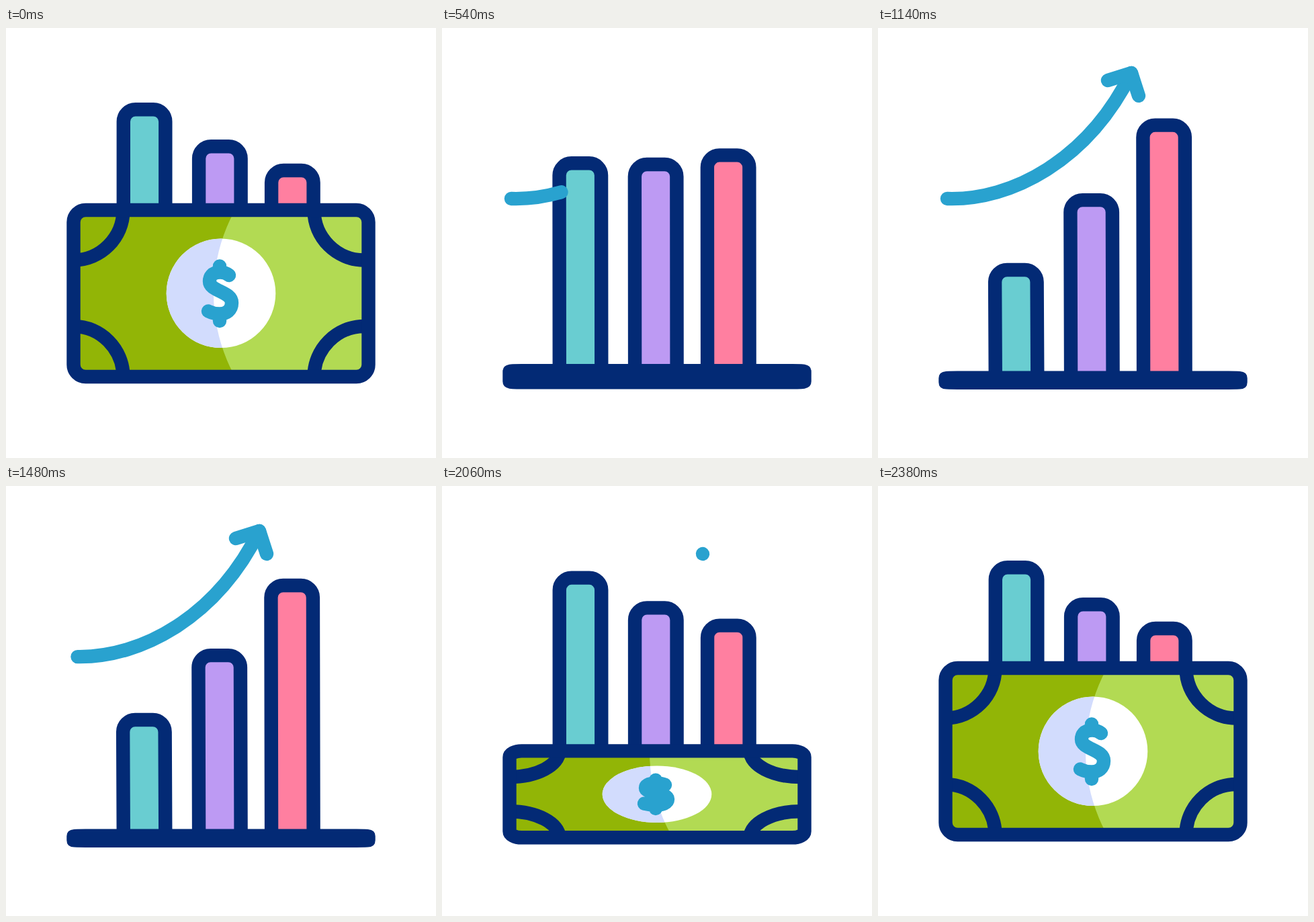
Animation, 640 px wide and 640 px high, one loop 2.4 s. Source, as an HTML page:

```html
<!DOCTYPE html>
<html lang="en">
<head>
<meta charset="utf-8">
<title>Money and growth</title>
<style>
  html, body { margin: 0; width: 100%; height: 100%; overflow: hidden; background: #fff; }
  svg { display: block; width: 100%; height: 100%; }
  .line { fill: none; stroke: #032a75; stroke-width: 20.4; stroke-linejoin: round; }
  .blue { fill: none; stroke: #29a2cf; stroke-width: 20.4; stroke-linecap: round; stroke-linejoin: round; }
</style>
</head>
<body>
<svg viewBox="0 0 640 640">
  <defs>
    <clipPath id="shade"><path d="M0 0H567V137A258 258 0 0 0 567 653H0Z"/></clipPath>
  </defs>
  <g id="bars"></g>
  <path class="note" fill="#b2da53"/>
  <path class="note" fill="#92b506" clip-path="url(#shade)"/>
  <ellipse class="disc" cx="320" fill="#fff"/>
  <ellipse class="disc" cx="320" fill="#d2dcfd" clip-path="url(#shade)"/>
  <path id="dollar" class="blue"/>
  <path id="arcs" class="line"/>
  <path class="note line"/>
  <path id="curve" class="blue" pathLength="1" d="M103,254C200,257 313,196 377,67"/>
  <path id="head" class="blue" pathLength="1" d="M342,78L377,67L388,101"/>
</svg>
<script>
const LOOP = 2400;
const FLOOR = 528;   // the note folds down onto this line
const FLAT = 0.028;  // its height when folded

const NOTE = 'M118.5,271L521.5,271C531.5,271 539.5,279 539.5,289L539.5,501' +
  'C539.5,511 531.5,519 521.5,519L118.5,519C108.5,519 100.5,511 100.5,501' +
  'L100.5,289C100.5,279 108.5,271 118.5,271Z';
const ARCS = 'M174.5,271C174.5,312 141,345.5 100.5,345.5' +
  'M174.5,519C174.5,478 141,444 100.5,444' +
  'M458.5,271C458.5,312 492,345.5 533,345.5L539.5,345.5' +
  'M458.5,519C458.5,478 492,444 533,444L539.5,444';
const DOLLAR = 'M332,368C327,364 322.5,363.5 319,363.5C306,363.5 303,371 303,377' +
  'C303,392 336,392 336,409C336,420 328,425.5 318,425.5C312,425.5 306,424 301,421.5' +
  'M318,354.5L318,363.5M318,425.5L318,436';

const BARS = [
  { x: 174.8, from: 121.2, to: 360.2, fill: '#69cdd1' },
  { x: 287.1, from: 176.2, to: 256.2, fill: '#bd9af3' },
  { x: 395.1, from: 212, to: 144.6, fill: '#ff7fa0' }
];

const $ = id => document.getElementById(id);
const all = cls => [...document.querySelectorAll('.' + cls)];
const notes = all('note'), discs = all('disc');

for (const bar of BARS) {
  bar.el = document.createElementNS('http://www.w3.org/2000/svg', 'path');
  bar.el.setAttribute('class', 'line');
  bar.el.style.fill = bar.fill;
  $('bars').append(bar.el);
}

// cubic-bezier(.75, 0, .25, 1) between two times
function ease(t, start, end) {
  const u = (t - start) / (end - start);
  if (u <= 0) return 0;
  if (u >= 1) return 1;
  let lo = 0, hi = 1;
  for (let i = 0; i < 30; i++) {
    const s = (lo + hi) / 2;
    if (s * (2.25 + s * (2.5 * s - 3.75)) < u) lo = s; else hi = s;
  }
  return lo * lo * (3 - 2 * lo);
}

const foldY = (y, k) => FLOOR + (y - FLOOR) * k;
const fold = (d, k) => d.replace(/,([\d.]+)/g, (_, y) => ',' + foldY(+y, k).toFixed(2));

function barPath(x, y, lean) {
  const l = x - lean;
  return `M${x} 521L${l} ${y + 18}a18 18 0 0 1 18 -18h26.5a18 18 0 0 1 18 18L${x + 62.5} 521`;
}

function trim(el, from, to) {
  const len = to - from;
  el.style.display = len > 0.0005 ? '' : 'none';
  el.setAttribute('stroke-dasharray', `${Math.max(len, 0)} 3`);
  el.setAttribute('stroke-dashoffset', -from);
}

function draw(t) {
  const p = ease(t, 0, 1190) - ease(t, 1190, 2380);
  for (const b of BARS) {
    b.el.setAttribute('d', barPath(b.x, b.from + (b.to - b.from) * p, 0.7 * p));
  }

  const k = 1 - (1 - FLAT) * (ease(t, 0, 700) - ease(t, 1740, 2380));
  const outline = fold(NOTE, k);
  notes.forEach(el => el.setAttribute('d', outline));
  discs.forEach(el => {
    el.setAttribute('cy', foldY(394.8, k));
    el.setAttribute('rx', 81.3);
    el.setAttribute('ry', 81.3 * k);
  });
  $('arcs').setAttribute('d', fold(ARCS, k));
  $('dollar').setAttribute('d', fold(DOLLAR, k));

  trim($('curve'), ease(t, 1440, 1780), ease(t, 282, 922));
  trim($('head'), ease(t, 1480, 2080), ease(t, 536, 1176));
}

function tick() {
  draw(performance.now() % LOOP);
  requestAnimationFrame(tick);
}
tick();
</script>
</body>
</html>
```
